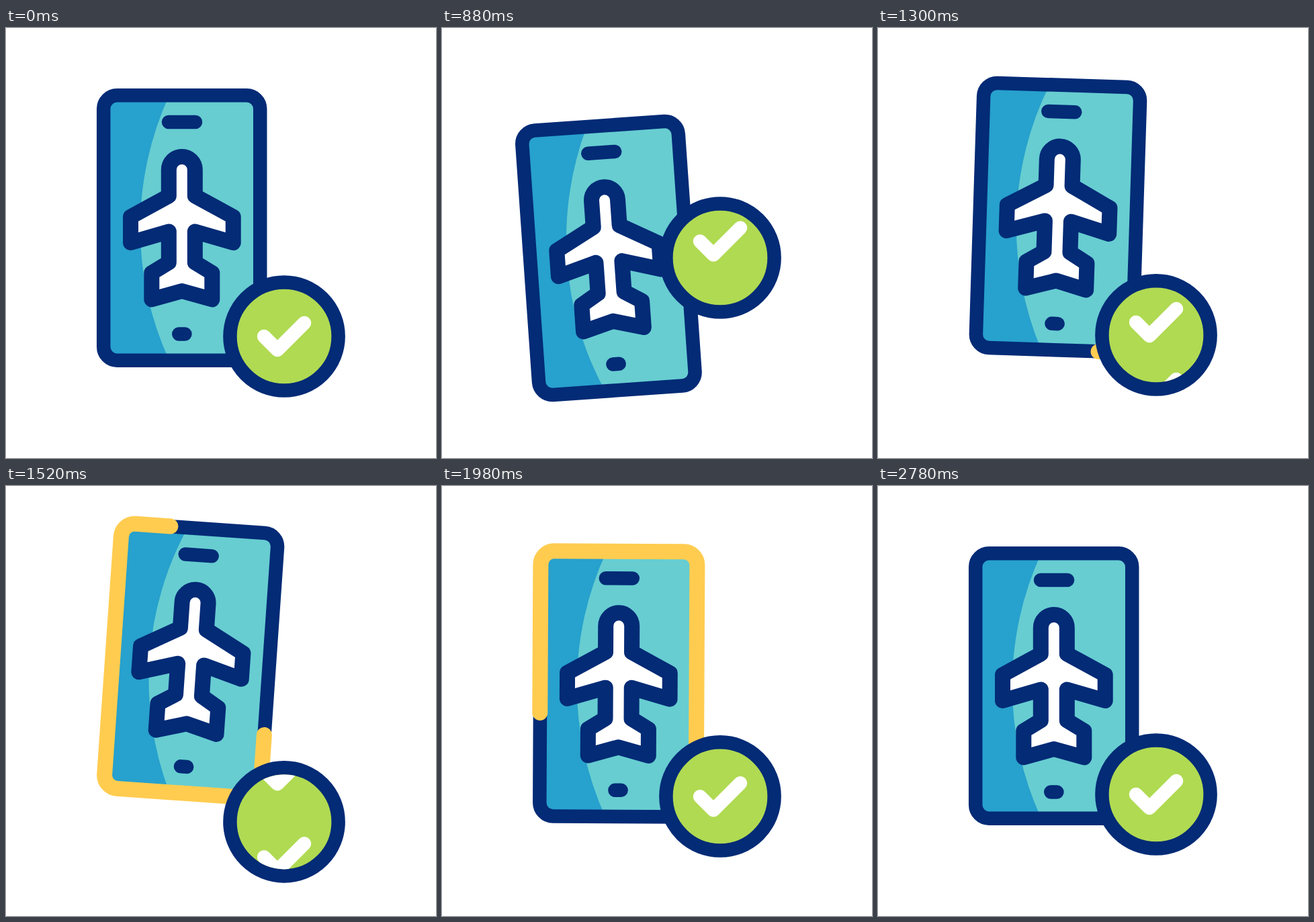
Animation, 640 px wide and 640 px high, one loop 2.96 s. Source, as an HTML page:

```html
<!DOCTYPE html>
<html lang="en">
<head>
<meta charset="utf-8">
<title>Boarding pass confirmed</title>
<style>
  html, body { margin: 0; width: 100%; height: 100%; overflow: hidden; background: #fff; }
  svg { display: block; width: 100%; height: 100%; }
  .line { fill: none; stroke: #032b76; stroke-width: 20.5; stroke-linecap: round; stroke-linejoin: round; }
</style>
</head>
<body>
<svg viewBox="0 0 640 640">
  <defs>
    <clipPath id="disc"><circle cx="414" cy="459" r="70.5"/></clipPath>
    <path id="tick" d="M384 459l20 20 40-40" class="line" style="stroke:#fff"/>
  </defs>
  <g id="phone">
    <rect x="145" y="100" width="233" height="395" rx="20" fill="#67cdd1"/>
    <path d="M243 100A473 473 0 0 0 243 495H165a20 20 0 0 1-20-20V120a20 20 0 0 1 20-20z" fill="#27a1cd"/>
    <rect x="145.2" y="100.3" width="233" height="394.4" rx="20" class="line"/>
    <path d="M242 140h40M257.2 455.5h9.2" class="line"/>
    <path d="M242.3 211a19.5 19.5 0 0 1 39 0V250L338.200 281V319.500L281.300 303V349L306.800 364.500V404L261.800 391.500 216.800 404V364.500L242.300 349V303L185.500 319.500V281L242.300 250z"
      class="line" style="fill:#fff;stroke-width:23"/>
    <path id="glow" d="M378 400V475a20 20 0 0 1-20 20H165a20 20 0 0 1-20-20V120a20 20 0 0 1 20-20H358a20 20 0 0 1 20 20V400"
      class="line" style="stroke:#ffcc50;stroke-width:23"/>
  </g>
  <g id="badge">
    <circle cx="414" cy="459" r="80.600" class="line" style="fill:#b0da52"/>
    <g clip-path="url(#disc)">
      <use href="#tick" id="oldTick"/>
      <use href="#tick" id="newTick"/>
    </g>
  </g>
</svg>
<script>
  const LOOP = 2960, STEP = 20;
  const el = id => document.getElementById(id);
  const [phone, glow, badge, oldTick, newTick] =
    ['phone', 'glow', 'badge', 'oldTick', 'newTick'].map(el);
  const pathLen = glow.getTotalLength();

  const ease = x => (1 - Math.cos(Math.PI * x)) / 2;

  // Eased value at time t through [time, value] keys
  function track(t, keys) {
    let [t0, v0] = keys[0];
    if (t <= t0) return v0;
    for (const [t1, v1] of keys) {
      if (t < t1) return v0 + (v1 - v0) * ease((t - t0) / (t1 - t0));
      t0 = t1;
      v0 = v1;
    }
    return v0;
  }

  // Shared swing: rest, first pose, second pose, rest
  const swing = (t, a, b) =>
    track(t, [[0, 0], [530, a], [928, a], [1500, b], [2080, 0]]);

  const shiftY = (node, y) => node.setAttribute('transform', `translate(0 ${y})`);

  function draw(t) {
    phone.setAttribute('transform',
      `translate(0 ${swing(t, 44.5, -38)}) rotate(${swing(t, -4, 4)} 262 495)`);
    shiftY(badge, swing(t, -117, 41));
    shiftY(oldTick, track(t, [[0, 0], [900, -24.5], [1260, -17], [1700, -110]]));
    shiftY(newTick, track(t, [[1034, 104], [2011, 0]]));
    oldTick.style.display = t < 1700 ? '' : 'none';
    newTick.style.display = t > 1034 ? '' : 'none';
    if (t <= 20) {
      oldTick.style.display = '';
    }

    const head = track(t, [[1170, 0], [1770, pathLen]]);
    const tail = track(t, [[1760, 0], [2280, pathLen]]);
    glow.style.display = head - tail > 0.5 && t < 2260 ? '' : 'none';
    glow.style.strokeDasharray = `0 ${tail} ${head - tail} ${2 * pathLen}`;
  }

  const start = performance.now();
  function frame() {
    const t = (performance.now() - start) % LOOP;
    draw(Math.floor(t / STEP) * STEP);
    requestAnimationFrame(frame);
  }
  frame();
</script>
</body>
</html>
```
